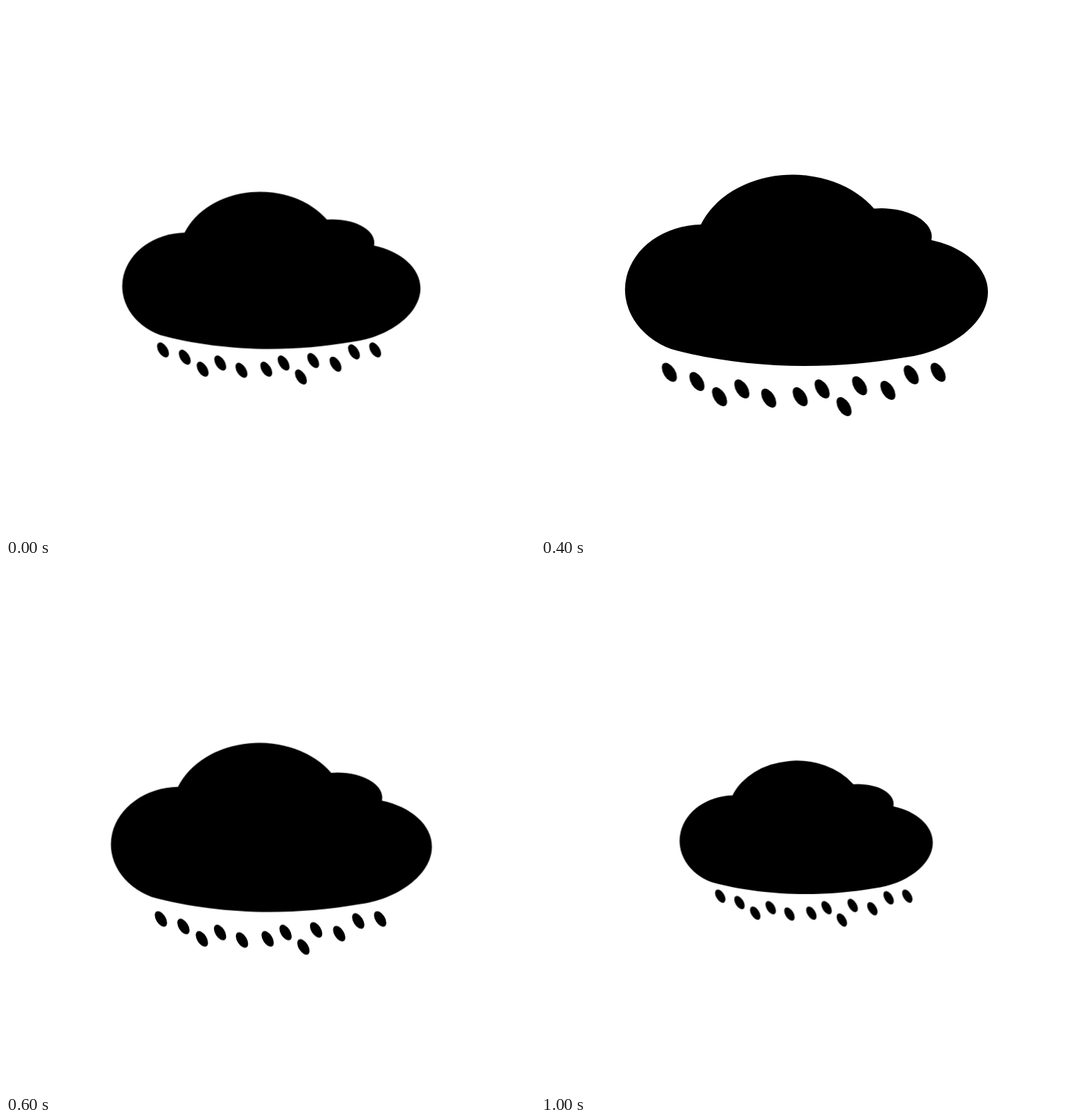
Animation of 748 by 748 pixels, one loop 1200 ms. Source, as an HTML page:

```html
<!DOCTYPE html>
<html lang="en">
<head>
<meta charset="utf-8">
<title>Rain cloud</title>
<style>
  html, body { margin: 0; width: 100%; height: 100%; overflow: hidden; background: #fff; }
  svg { display: block; width: 100%; height: 100%; }
</style>
</head>
<body>
<svg viewBox="0 0 748 748">
  <path id="cloud" d="M226 309
    A139.5 110.5 0 0 1 471 286.5
    A71.3 40 0 0 1 552 331
    C599 341 632 370 632 404.5
    C632 450 576 489.5 514 497
    C466 505 422 509 372 509
    C310 509 239 500.5 184 485
    A110 92 0 0 1 226 309Z"/>
  <g id="rain"></g>
</svg>
<script>
const LOOP = 1200;
const cloud = document.getElementById('cloud');
const rain = document.getElementById('rain');

// Drop centres relative to the leftmost drop
const drops = [
  [0, 0], [39, 13], [71, 34.5], [102.5, 23.5], [140.5, 36.5], [185, 34.5],
  [216, 23.5], [247, 48.5], [269, 19], [309, 25.5], [342, 3.5], [380, 0]
];
for (const [x, y] of drops) {
  const drop = document.createElementNS('http://www.w3.org/2000/svg', 'ellipse');
  drop.setAttribute('rx', 8.3);
  drop.setAttribute('ry', 15);
  drop.setAttribute('transform', `translate(${x} ${y}) rotate(-32)`);
  rain.append(drop);
}

// Cloud scale, then rain x, y and scale for each step
const poses = [
  [0.8217, 222, 486.3, 0.7895],
  [0.842, 228, 486.8, 0.8237],
  [1, 181.5, 518, 1],
  [0.8845, 219, 503.3, 0.8158],
  [0.7597, 232, 476.3, 0.7658],
  [0.6977, 253.5, 471, 0.696]
];

const place = (x, y, s) => `translate(${x}px, ${y}px) scale(${s})`;

function play(el, transforms) {
  const steps = [...transforms, transforms[0]].map((transform, i) => ({
    transform, offset: i / transforms.length, easing: 'step-end'
  }));
  el.animate(steps, { duration: LOOP, iterations: Infinity }).startTime = 0;
}

play(cloud, poses.map(([s]) => place(374 * (1 - s), 374 * (1 - s), s)));
play(rain, poses.map(([, x, y, s]) => place(x, y, s)));
</script>
</body>
</html>
```
